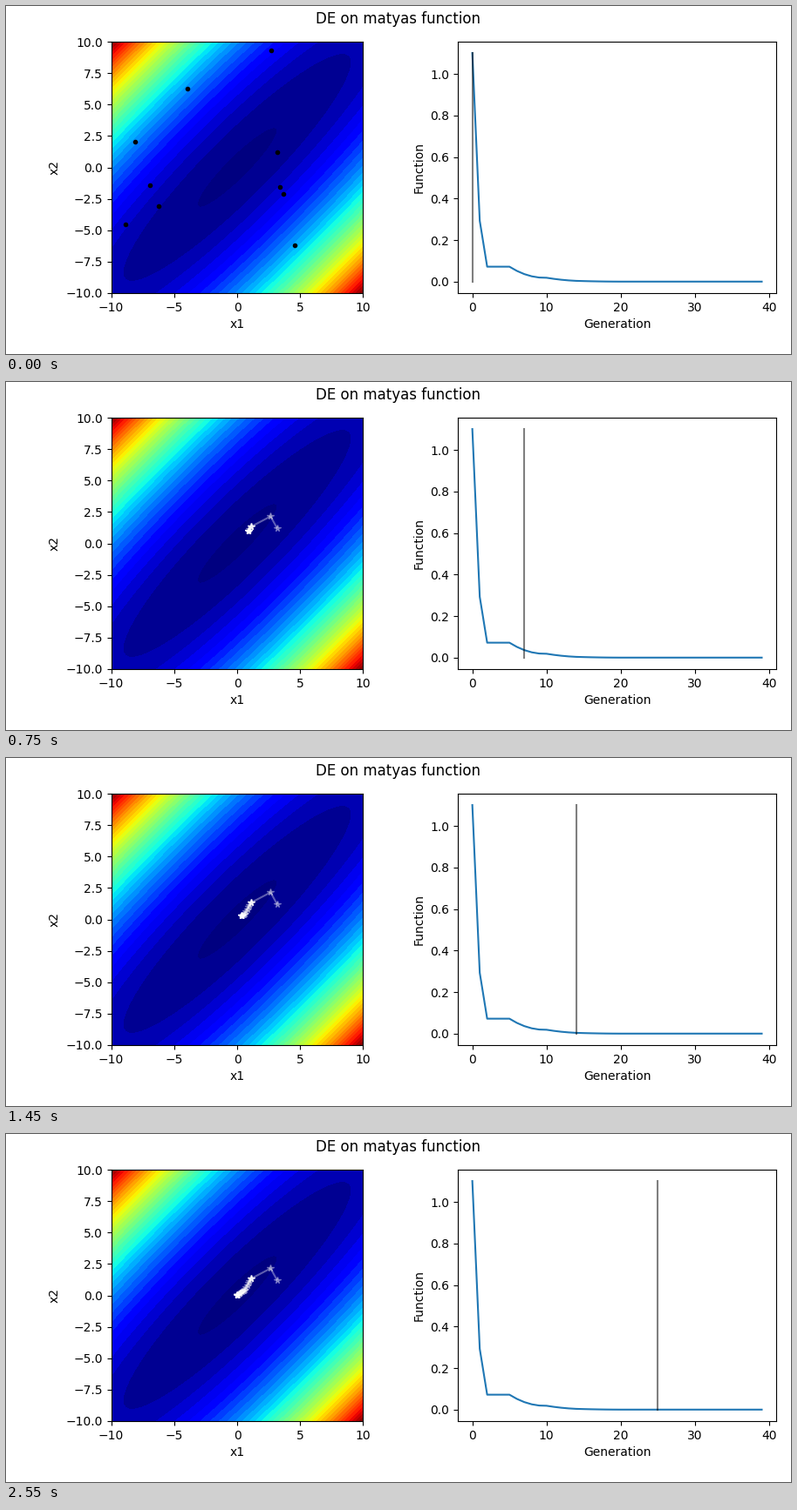
A matplotlib script for the animation above (2.6 s loop, 900 px wide and 400 px high).

```python
import numpy as np
import matplotlib.pyplot as plt
from matplotlib.animation import FuncAnimation

W, H = 900, 400
STEPS = 52
GENS = 40

plt.rcParams["font.family"] = "DejaVu Sans"


def matyas(x, y):
    return 0.26 * (x**2 + y**2) - 0.48 * x * y


def add_axes(fig, left, width, xlabel, ylabel):
    ax = fig.add_axes([left / W, 70.05 / H, width / W, 288.9 / H])
    ax.set_xlabel(xlabel)
    ax.set_ylabel(ylabel)
    return ax


def best_path():
    """Best point of every generation, eased between a few turning points."""
    gens, xs, ys = zip((0, 3.15, 1.245), (1, 2.65, 2.15), (2, 1.08, 1.32),
                       (5, 1.08, 1.32), (10, 0.62, 0.45), (14, 0.31, 0.30),
                       (20, 0.03, 0.01))
    g = np.arange(GENS)
    return np.c_[np.interp(g, gens, xs), np.interp(g, gens, ys)]


def evolve(start, best):
    """Populations that shrink around the best point, mostly along the valley."""
    rng = np.random.default_rng(4)
    size = len(start)
    pops = [start]
    for g in range(1, STEPS // 2):
        spread = 8 * 0.6**g if g < 6 else 0.6 * 0.92 ** (g - 6)
        low = -1 if g < 5 else -0.3
        along = rng.uniform(low, 1, size)
        across = rng.uniform(-0.25, 0.25, size)
        trial = best[g] + spread * np.c_[along + across, along - across] / np.sqrt(2)
        far = np.hypot(*(pops[-1] - best[g]).T) > 1.5 * spread
        swap = far | (rng.random(size) < 0.5)
        pop = np.where(swap[:, None], trial, pops[-1])
        pop[0] = best[g]
        pops.append(pop)
    return pops


best = best_path()
history = matyas(*best.T)
start = np.array([
    best[0], (2.68, 9.32), (-3.97, 6.28), (-8.12, 2.02), (-6.92, -1.40),
    (-6.25, -3.10), (-8.87, -4.52), (3.42, -1.53), (3.70, -2.13), (4.60, -6.22),
])
pops = evolve(start, best)

fig = plt.figure(figsize=(W / 100, H / 100), dpi=100, facecolor="white")
fig.suptitle("DE on matyas function", x=449.3 / W, y=393.5 / H)

ax_map = add_axes(fig, 120.6, 288.9, "x1", "x2")
grid = np.linspace(-10, 10, 201)
X, Y = np.meshgrid(grid, grid)
levels = 0.385 + 2.77 * np.arange(-1, 37)
ax_map.contourf(X, Y, matyas(X, Y), levels=levels, cmap="jet", vmin=0, vmax=100,
                antialiased=False)
ax_map.set(xlim=(-10, 10), ylim=(-10, 10), xticks=[-10, -5, 0, 5, 10])
trail, = ax_map.plot([], [], "w*-", ms=5.5, lw=1.5, alpha=0.37, zorder=3)
dots, = ax_map.plot([], [], "k.", ms=6, zorder=4)
star, = ax_map.plot([], [], "w*", ms=6, zorder=5)

ax_fit = add_axes(fig, 518.05, 365, "Generation", "Function")
ax_fit.plot(history, color="C0", lw=1.5)
marker, = ax_fit.plot([0, 0], [0, history[0]], color="black", lw=1.5, alpha=0.5)
ax_fit.set_xlim(-1.95, 40.95)
ax_fit.set_ylim(-0.055, 1.155)


def update(n):
    # Each generation shows its population, then its best point
    gen = max(n - 1, 0) // 2
    show_best = n % 2 == 1
    past = best[: gen + 1] if n else best[:0]
    trail.set_data(past[:, 0], past[:, 1])
    crowd = pops[n // 2][: 0 if show_best else None]
    dots.set_data(crowd[:, 0], crowd[:, 1])
    top = best[gen : gen + show_best]
    star.set_data(top[:, 0], top[:, 1])
    marker.set_xdata([gen, gen])
    return trail, dots, star, marker


anim = FuncAnimation(fig, update, frames=STEPS, interval=50, repeat=True,
                     repeat_delay=0, blit=False)
plt.show()
```
